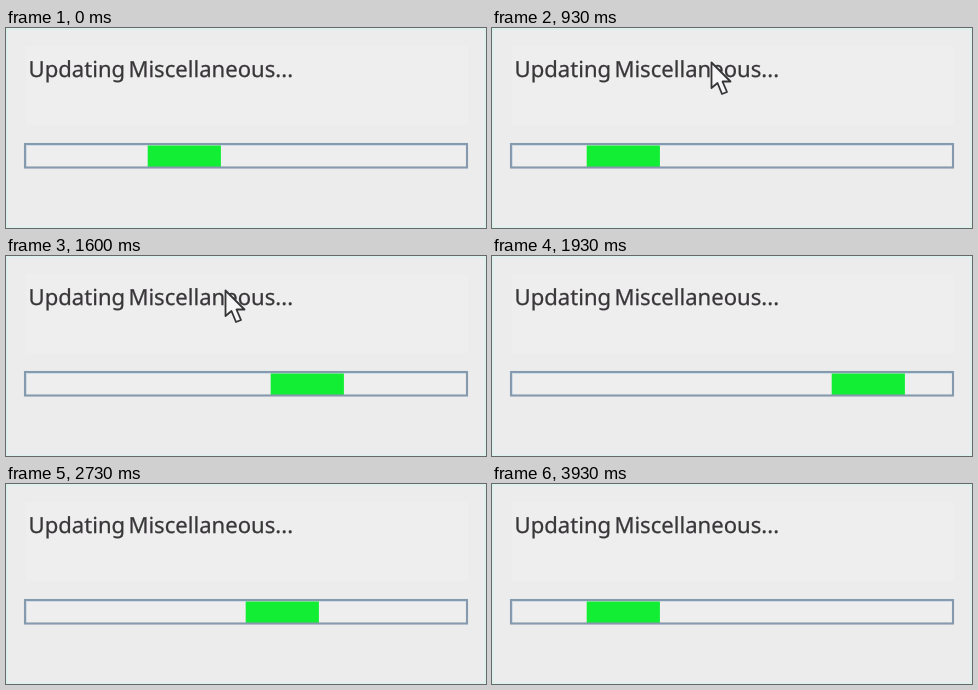
An HTML page for the animation above (3.99 s loop, 480 px wide and 200 px high).

```html
<!DOCTYPE html>
<html lang="en">
<head>
<meta charset="utf-8">
<title>Updating</title>
<style>
  html, body { margin: 0; width: 100%; height: 100%; overflow: hidden; background: #ececec; }
  svg { display: block; width: 480px; height: 200px; }
  text {
    font: 22.1px "Noto Sans", "Open Sans", sans-serif;
    word-spacing: -2.5px;
    text-rendering: geometricPrecision;
    fill: #393639;
    stroke: #393639;
    stroke-width: .25px;
  }
</style>
</head>
<body>
<svg viewBox="0 0 480 200">
  <rect width="480" height="200" fill="#ececec"/>
  <rect x="1" y="1" width="478" height="198.5" fill="none" stroke="#dcf0ee" stroke-width="2"/>
  <rect x="20" y="18" width="442" height="79" fill="#eee"/>
  <text x="22.5" y="49">Updating Miscellaneous...</text>

  <rect x="19" y="116" width="442" height="23.5" fill="#eee"/>
  <path d="M20.5 139V117.5H460" fill="none" stroke="#d3e1eb"/>
  <rect id="block" y="117.5" width="73.2" height="21.8" fill="#11ee33"/>
  <rect x="19" y="116" width="442" height="23.5" fill="none" stroke="#869aae" stroke-width="2.1"/>

  <path id="pointer" d="M219.5 34.5V60L225.5 55L230 66L235 64L230.5 53.5H238.5Z"
        fill="#f6f6f6" stroke="#353538" stroke-width="1.8" stroke-linejoin="round"/>
</svg>
<script>
  const LOOP = 3990, TICK = 1000 / 15;
  // Left edges the block stops at, from one end of the track to the other
  const stops = [20, 44, 69, 95, 116, 142, 167, 191, 216, 240, 265, 290, 315, 340, 364, 389];
  const last = stops.length - 1;
  const block = document.getElementById("block");
  const pointer = document.getElementById("pointer");

  function draw() {
    const tick = Math.floor((performance.now() % LOOP + 4) / TICK);
    // The block moves two stops every three ticks and bounces at both ends
    const step = Math.max(25, 24 + Math.floor(tick * 2 / 3));
    const stop = last - Math.abs(last - step % (2 * last));
    block.setAttribute("x", stops[stop] - 0.3);
    pointer.style.display = tick >= 5 && tick < 28 ? "" : "none";
    requestAnimationFrame(draw);
  }
  draw();
</script>
</body>
</html>
```
